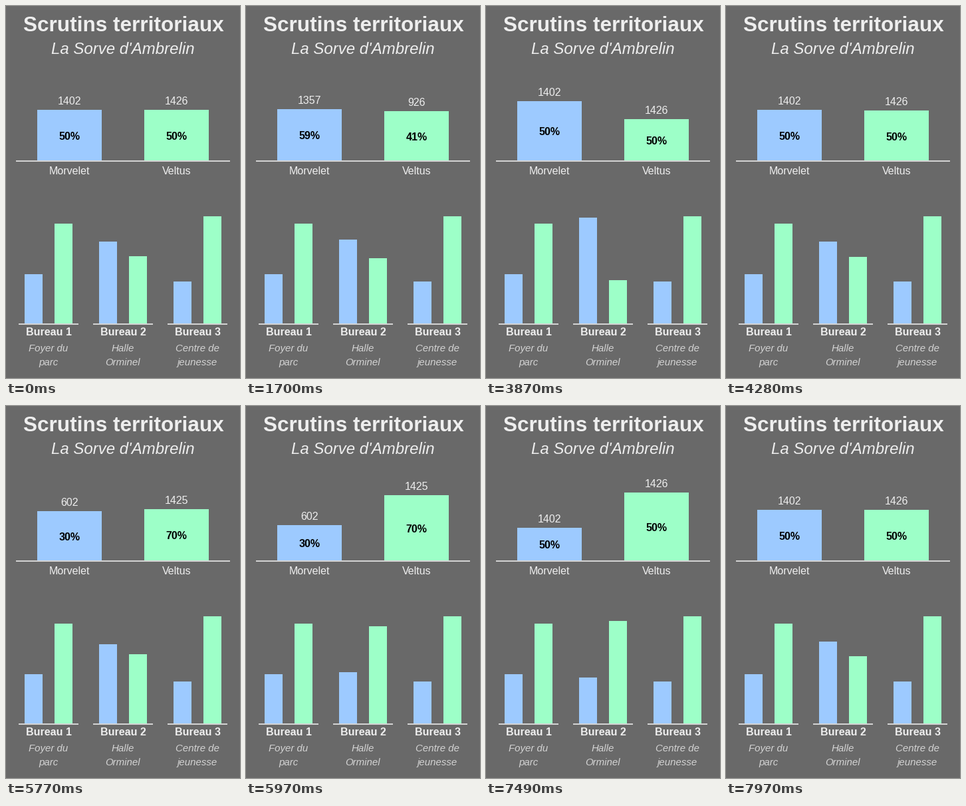
These frames come from a looping animation (352x559 px, 9120 ms). A matplotlib script:

```python
import numpy as np
import matplotlib.pyplot as plt
from matplotlib.animation import FuncAnimation
from matplotlib.patches import Rectangle

W, H, DPI = 352, 559, 64
LOOP, STEP = 9120, 20
BACK, BLUE, GREEN = "#696969", "#9dcaff", "#9dffc8"
WHITE, GRAY = "#eeeeee", "#d3d3d3"
TOTAL_BASE, OFFICE_BASE = 232, 477

# Bar tops: total blue, total green, middle office blue, middle office green
EVEN = (np.array([156, 156.4, 354.2, 376.4]), ("1402", "1426"), ("50%", "50%"))
BLUE_LEAD = (np.array([143, 170.4, 318.2, 412.4]), ("1357", "926"), ("59%", "41%"))
GREEN_LEAD = (np.array([186, 126.4, 414.2, 316.4]), ("602", "1425"), ("30%", "70%"))

# start ms, span ms, number of steps, ms already eased at the start, from, to
MOVES = [
    (1650, 510, 11, 0, EVEN, BLUE_LEAD),
    (3870, 510, 11, 0, BLUE_LEAD, EVEN),
    (5770, 480, 10, 37, EVEN, GREEN_LEAD),
    (7490, 480, 10, 55, GREEN_LEAD, EVEN),
]
EASE_MS = 500

# Cubic bezier (.25, .1, .25, 1)
s = np.linspace(0, 1, 200)
EASE_X = 0.75 * (1 - s) ** 2 * s + 0.75 * (1 - s) * s**2 + s**3
EASE_Y = 0.3 * (1 - s) ** 2 * s + 3 * (1 - s) * s**2 + s**3

plt.rcParams["font.family"] = "Liberation Sans"
fig = plt.figure(figsize=(W / DPI, H / DPI), dpi=DPI, facecolor=BACK)
ax = fig.add_axes([0, 0, 1, 1])
ax.set_xlim(0, W)
ax.set_ylim(H, 0)
ax.axis("off")


def box(x, top, width, bottom, color):
    return ax.add_patch(Rectangle((x, top), width, bottom - top, fc=color, lw=0,
                                  antialiased=False))


def label(x, y, text, px=16, color=WHITE, **style):
    return ax.text(x, y, text, fontsize=px * 72 / DPI, color=color,
                   ha="center", va="baseline", **style)


def set_top(bar, top, bottom):
    bar.set_y(top)
    bar.set_height(bottom - top)


label(176.5, 38.5, "Scrutins territoriaux", 31.5, weight="bold")
label(176, 72, "La Sorve d'Ambrelin", 24, style="italic")

totals, counts, shares = [], [], []
for x, name, color in [(47, "Morvelet", BLUE), (208, "Veltus", GREEN)]:
    totals.append(box(x, 156, 97, TOTAL_BASE, color))
    counts.append(label(x + 48.5, 148, ""))
    shares.append(label(x + 48.5, 201, "", color="black", weight="bold"))
    label(x + 48.5, 253, name)
box(15, TOTAL_BASE, 322, TOTAL_BASE + 2, GRAY)

offices = [
    (403, 327, "Foyer du", "parc"),
    (354, 376, "Halle", "Orminel"),
    (414, 316, "Centre de", "jeunesse"),
]
office_bars = []
for i, (blue_top, green_top, line1, line2) in enumerate(offices):
    x = 19 + 112 * i
    office_bars.append((box(x + 9, blue_top, 27, OFFICE_BASE, BLUE),
                        box(x + 54, green_top, 27, OFFICE_BASE, GREEN)))
    box(x, OFFICE_BASE, 90, OFFICE_BASE + 2, GRAY)
    label(x + 45, 495, f"Bureau {i + 1}", weight="bold")
    label(x + 45, 519, line1, 15, GRAY, style="italic")
    label(x + 45, 540, line2, 15, GRAY, style="italic")


def state_at(t):
    tops, votes, percents = EVEN
    for start, span, steps, lead, old, new in MOVES:
        if t >= start:
            k = min(steps, int((t - start) * steps / span))
            progress = min(1, (lead + k * span / steps) / EASE_MS)
            eased = np.interp(progress, EASE_X, EASE_Y)
            tops = old[0] + (new[0] - old[0]) * eased
            votes, percents = new[1:]
    return np.round(tops), votes, percents


def update(frame):
    tops, votes, percents = state_at(frame * STEP + STEP / 2)
    for i in range(2):
        set_top(totals[i], tops[i], TOTAL_BASE)
        set_top(office_bars[1][i], tops[2 + i], OFFICE_BASE)
        counts[i].set_text(votes[i])
        counts[i].set_y(tops[i] - 8)
        shares[i].set_text(percents[i])
        shares[i].set_y((tops[i] + TOTAL_BASE) / 2 + 7)
    return [*totals, *office_bars[1], *counts, *shares]


anim = FuncAnimation(fig, update, frames=LOOP // STEP, interval=STEP,
                     repeat=True, repeat_delay=0)
plt.show()
```
